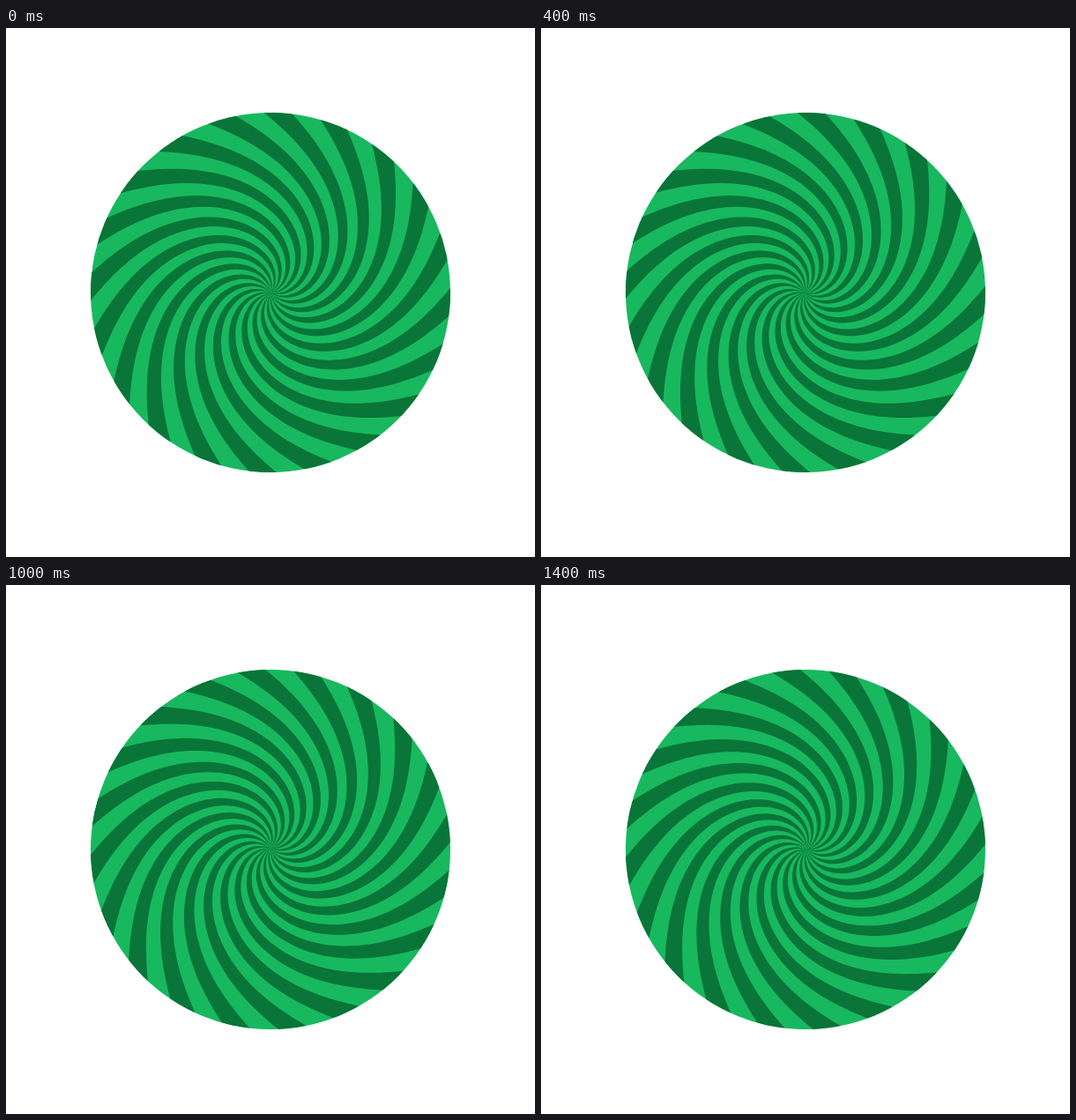
An HTML page that plays this animation: 600 by 600 pixels, repeating every 1600 ms.

```html
<!DOCTYPE html>
<html lang="en">
<head>
<meta charset="utf-8">
<title>Spinning swirl</title>
<style>
  html, body { margin: 0; width: 100%; height: 100%; overflow: hidden; background: #fff; }
  svg { display: block; width: 100vw; height: 100vh; }
</style>
</head>
<body>
<svg viewBox="0 0 600 600">
  <clipPath id="rim"><circle cx="300" cy="300" r="204"/></clipPath>
  <g id="disc">
    <circle cx="300" cy="300" r="204" fill="#18b85f"/>
    <g clip-path="url(#rim)"><path id="arms" fill="#097538"/></g>
  </g>
</svg>
<script>
  const LOOP = 1600, STEPS = 8;
  const ARMS = 20, RADIUS = 204, REACH = 212;
  const RAD = Math.PI / 180;
  const TWIST = 150 * RAD, TWIST_RADIUS = 300;
  const START = -2 * RAD;
  // The swirl sits slightly off the pivot, so it wobbles as it turns.
  const HUB = { x: 300.9, y: 300.9 };
  const PIVOT = '300 300';

  const disc = document.getElementById('disc');

  // Twirl: rays wind up towards the middle, fading out at TWIST_RADIUS.
  const twirl = r => TWIST * (1 - r / TWIST_RADIUS) ** 2;

  function point(r, rimAngle) {
    const a = rimAngle + twirl(r) - twirl(RADIUS);
    return (HUB.x + r * Math.sin(a)).toFixed(2) + ' ' + (HUB.y - r * Math.cos(a)).toFixed(2);
  }

  function edge(rimAngle) {
    const points = [];
    for (let r = 0; r <= REACH; r += 4) points.push(point(r, rimAngle));
    return points;
  }

  function arm(i) {
    const width = Math.PI / ARMS;
    const from = START + 2 * width * i;
    return 'M' + [...edge(from), ...edge(from + width).reverse()].join('L') + 'Z';
  }

  function draw(ms) {
    const step = Math.floor((ms % LOOP) / LOOP * STEPS);
    disc.setAttribute('transform', `rotate(${step * 360 / STEPS} ${PIVOT})`);
  }

  document.getElementById('arms').setAttribute('d', Array.from({ length: ARMS }, (_, i) => arm(i)).join(''));

  let start = null;
  function tick(now) {
    if (start === null) start = now;
    draw(now - start);
    requestAnimationFrame(tick);
  }
  draw(0);
  requestAnimationFrame(tick);
</script>
</body>
</html>
```
